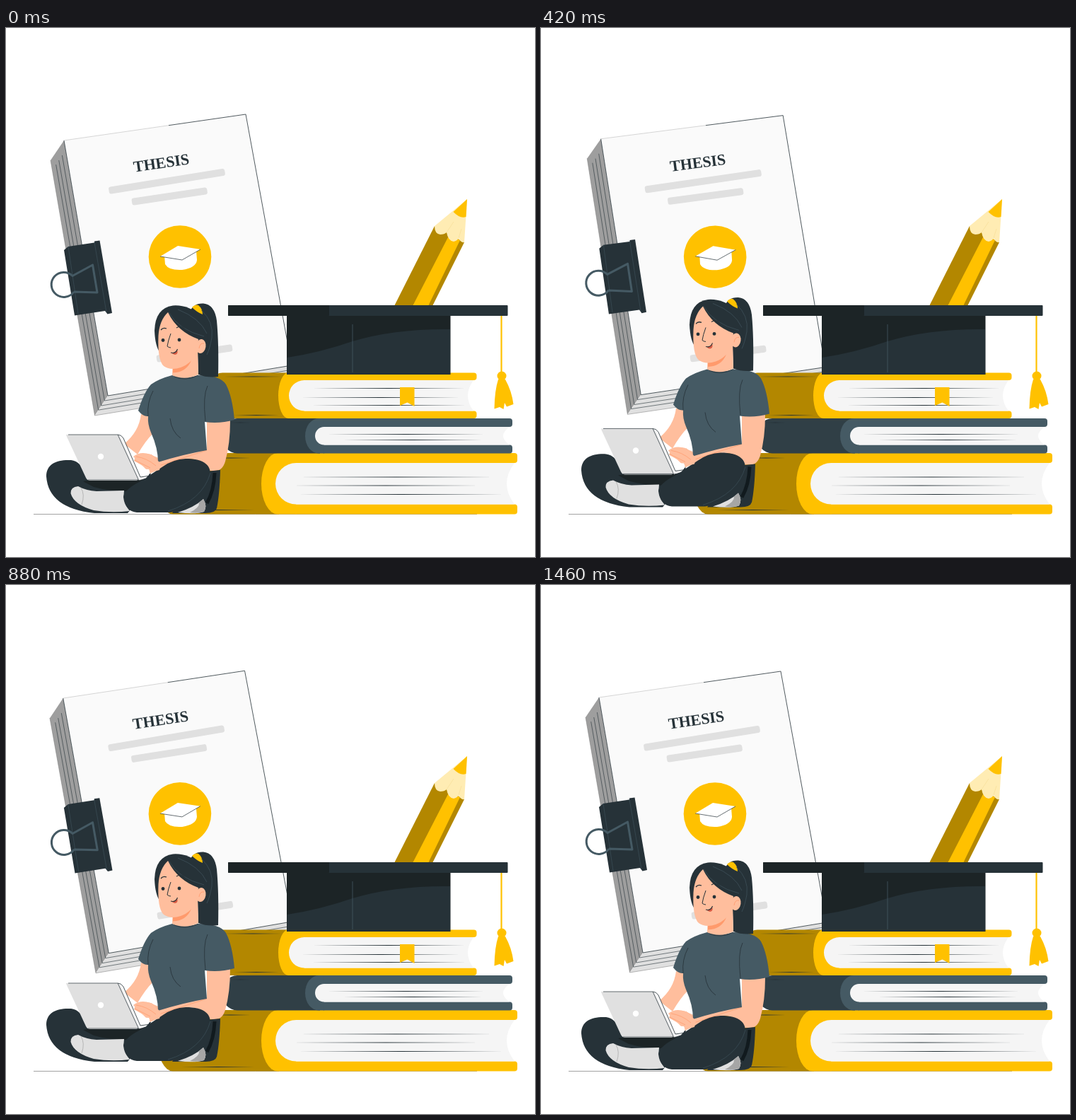
Animation of 748x748 px, one loop 1.5 s. Source, as an HTML page with a canvas:

```html
<!DOCTYPE html>
<html lang="en">
<head>
<meta charset="utf-8">
<title>Thesis</title>
<style>
  html, body { margin: 0; width: 100%; height: 100%; overflow: hidden; background: #fff; }
  canvas { display: block; width: 748px; height: 748px; }
</style>
</head>
<body>
<canvas id="stage" width="748" height="748"></canvas>
<script>
const ctx = document.getElementById('stage').getContext('2d');
const YELLOW = '#ffc100', GOLD = '#b38700', INK = '#263238', SHADE = '#1c2426',
  SLATE = '#455a64', GREY = '#e0e0e0', SKIN = '#ffbe9d', BLUSH = '#ff9a6c';
const LOOP = 1500, STEP = 1500 / 36, LAST = 35;

function fill(d, color) {
  ctx.fillStyle = color;
  ctx.fill(new Path2D(d));
}
function line(d, color = INK, width = 0.8) {
  ctx.strokeStyle = color;
  ctx.lineWidth = width;
  ctx.stroke(new Path2D(d));
}
// A horizontal line that thins out towards both ends.
function taper(y, x1, x2) {
  const mid = (x1 + x2) / 2;
  fill(`M${x1} ${y}Q${mid} ${y - 0.9} ${x2} ${y}Q${mid} ${y + 0.9} ${x1} ${y}`, INK);
}
function disc(x, y, r, color) {
  ctx.fillStyle = color;
  ctx.beginPath();
  ctx.arc(x, y, r, 0, Math.PI * 2);
  ctx.fill();
}
function box(x, y, w, h, radii, color) {
  ctx.fillStyle = color;
  ctx.beginPath();
  ctx.roundRect(x, y, w, h, radii);
  ctx.fill();
}
function bar(x1, y1, x2, y2) {
  ctx.save();
  ctx.translate(x1, y1);
  ctx.rotate(Math.atan2(y2 - y1, x2 - x1));
  box(0, -5, Math.hypot(x2 - x1, y2 - y1), 10, 3, GREY);
  ctx.restore();
}

function paper() {
  fill('M82 159L63 187L125.500 548L144 520Z', '#9e9e9e');
  fill('M144 520L125.500 548L385 506L404 477Z', GREY);
  for (const k of [0.25, 0.5, 0.72]) {
    const dx = -18.5 * k, dy = 28 * k;
    line(`M${84 + dx} ${173 + dy}L${144 + dx} ${520 + dy}L${404 + dx} ${477 + dy}`, INK, 0.6);
  }
  line('M63 187L125.500 548L385 506', '#777', 0.5);
  fill('M82 159L339 122L404 477L144 520Z', '#fafafa');
  line('M230 137.700L339 122L404 477L144 520L82 159', INK, 0.8);
  line('M82 159L230 137.700', '#bbb', 0.6);

  ctx.save();
  ctx.translate(220.5, 198);
  ctx.rotate(-8.2 * Math.PI / 180);
  ctx.font = 'bold 22px "Liberation Serif", "Times New Roman", serif';
  ctx.textAlign = 'center';
  ctx.fillStyle = INK;
  ctx.fillText('THESIS', 0, 0);
  ctx.restore();
  bar(145.5, 230, 309.5, 203.5);
  bar(178, 246, 284.5, 230);
  bar(213, 468, 320, 452);

  disc(246, 323.5, 44.3, YELLOW);
  fill('M224 322L225 334Q230 343 249 342Q269 339 270 328L269 315Z', '#fff');
  fill('M218 323L243 308L275 313L249 328Z', '#fff');
  line('M218 323L249 328L275 313', INK, 0.7);
  clip();
}

function clip() {
  fill('M82 314L88 309L125 303.500L125 301.500L132.500 300.500L150 403L143.500 404.500L140 400L97 406.500Z', INK);
  line('M88 309L102 404M125 303L142 402', SLATE, 0.5);
  ctx.lineJoin = 'round';
  line('M96 373L129 374L122.500 335L94 350.500A17.500 17.500 0 1 0 96 373', SLATE, 3);
}

function book(b) {
  const { top, bottom, band, cover, curve, page, right, end, bite, color } = b;
  const ry = (bottom - top) / 2, py = ry - band;
  const round = page + py;
  fill(`M${cover + curve + 2} ${top}H${b.spine + 22}A22 ${ry} 0 0 0 ${b.spine + 22} ${bottom}H${cover + curve + 2}Z`, b.back);
  fill(`M${round} ${top}H${cover + curve}A${curve} ${ry} 0 0 0 ${cover + curve} ${bottom}H${round}Z`, color);
  box(round - 1, top, right - round + 1, band, [0, 4, 4, 0], color);
  box(round - 1, bottom - band, right - round + 1, band, [0, 4, 4, 0], color);
  fill(`M${end} ${top + band}H${round}A${py} ${py} 0 0 0 ${round} ${bottom - band}H${end}Q${end - bite * 2} ${top + ry} ${end} ${top + band}`, '#f5f5f5');
  for (const [y, x1, x2] of b.lines) taper(y, x1, x2);
}

function books() {
  book({ top: 601, bottom: 687.5, band: 14, spine: 214, cover: 361, curve: 23, page: 381,
    right: 723, end: 719, bite: 11, color: YELLOW, back: GOLD,
    lines: [[635, 414, 690], [647, 404, 670], [659.5, 414, 703], [608, 290, 346], [681.5, 248, 351]] });
  book({ top: 552, bottom: 601.5, band: 12, spine: 305, cover: 423, curve: 19, page: 437,
    right: 716, end: 712, bite: 9, color: SLATE, back: '#303f46',
    lines: [[574.5, 455, 676], [582.5, 477, 673], [558, 318, 345]] });
  book({ top: 487.5, bottom: 552, band: 10.5, spine: 284, cover: 385, curve: 14, page: 400,
    right: 665.5, end: 661, bite: 8, color: YELLOW, back: GOLD,
    lines: [[509.5, 434, 649], [522.5, 418, 641], [533.5, 432, 651], [493, 308, 390], [547.5, 322, 386]] });
  fill('M557 508H577.500V535L567.500 529.500L557 534Z', YELLOW);
}

function pencil() {
  fill('M606 280L549 393H603L648 303Z', GOLD);
  fill('M627 292L575 393H597L642 300Z', YELLOW);
  fill('M606 280Q606 291 614 292Q620 292 623 289Q625 301 633 302Q638 301 640 297Q643 304 648 303L652 242Z', '#ffecb3');
  fill('M652 242L632.500 260Q642 270 650.500 267Z', YELLOW);
  line('M623 289L633 274M640 297L644 284', '#f3d98c', 0.5);
}

function hat() {
  box(397, 405, 231.5, 85, 0, SHADE);
  fill('M397.500 466Q444 459 490 443Q550 425 628 426V489.500H397.500Z', INK);
  line('M490 419V487', SLATE);
  box(314, 392, 395.5, 15, 1, INK);
  box(314, 392, 143, 15, 1, SHADE);
  line('M700.500 407V488', YELLOW, 2.2);
  disc(701, 492, 6.5, YELLOW);
  fill('M696 497H706Q715 513 717.500 532L708 535.500L705 530L703.500 539L698 536L690.500 538.500Q691 512 696 497Z', YELLOW);
}

function legs() {
  fill('M283 627L303 625Q302 660 298 679Q296 686 282 686H235L260 650Z', INK);
  line('M295 629Q294 655 284 672', '#111a1e', 5);
  fill('M57 634C57 616 72 610 92 611Q106 612 118 638L205 630L190 665L172 686H125Q60 679 57 634Z', INK);
  fill('M109 641Q150 634 196 637L170 655Q145 655 124 649Z', SHADE);
  fill('M91.500 658Q91 649 102 648Q113 654 128 655L167 654Q164 670 175 683Q148 686 124 682Q96 674 91.500 658Z', GREY);
  line('M106 650Q112 660 107 674', '#999', 0.6);
  fill('M166 663Q168 652 190 641L222 620Q236 610 254 609C281 609 292 619 288 636Q284 656 262 671Q248 684 232 685H185Q168 683 166 663Z', INK);
  fill('M243 685Q266 678 279 666Q285 676 280 684Q268 688 243 685Z', GREY);
  fill('M260 685Q274 678 273 671L279 666Q285 676 280 684Q270 687 260 685Z', '#a6a6a6');
  line('M229 683Q278 668 289 629', SLATE, 0.5);
}

function torso() {
  fill('M191 546L203 549L208 573Q197 584 186 603L167 588Q188 571 191 546Z', SKIN);
  fill('M284 555H317Q317 588 310 613Q306 626 296 626L287 626Q279 609 256 609Q238 613 219 623L204 630L180 606Q190 598 204 603L218 609L284 596Z', SKIN);
  line('M284 597L216 619M183 612L199 621M184 606L207 620M205 603L215 612', BLUSH, 0.7);
  fill('M235 491Q253 497 272 491Q303 491 311 504Q320 521 323 554Q302 560 281 557L284 597Q250 603 215 614Q215 594 205 572Q200 560 201 549Q194 550 187 541Q195 515 205 504Q216 496 235 491Z', SLATE);
  line('M285 506Q278 520 282 556M208 513Q199 530 201 549M232 552Q234 571 247 580M238 493Q254 500 272 491', INK, 0.8);
}

function laptop() {
  fill('M180 623L202 624Q206 630 198 636L188 639Z', '#fff');
  fill('M158 575Q163 575 166 580L189 633L199 636L188 640Z', '#f5f5f5');
  line('M158 575Q163 575 166 580L190 635L204 633Q198 639 188 639.500', INK, 0.8);
  fill('M85 575H156Q159 575 161 579L187 637Q187 640 184 640H119Q115 640 113 636L86 578Z', GREY);
  line('M88 575H158L187 638M116 639H188', INK, 0.7);
  disc(134, 606, 4.2, '#fff');
}

function head() {
  fill('M260 402Q264 389 279 389.500Q295 391 298 414Q301 445 300 493Q285 495 272 490L270 430Z', INK);
  fill('M210 428Q211 396 236 392.500Q258 391 275 407Q286 421 284 441L274 450L218 459Q211 451 210 428Z', INK);
  fill('M236 465L271 452L272 490Q253 499 235 491Z', SKIN);
  fill('M236 480L262 470Q255 487 236 487.500Z', BLUSH);
  fill('M229 402Q217 413 215.500 435Q214 470 223 478Q233 485 247 480Q262 475 271 457L272 440Q242 429 229 402Z', SKIN);
  ctx.fillStyle = SKIN;
  ctx.beginPath();
  ctx.ellipse(275.5, 450, 7, 10, 0.15, 0, Math.PI * 2);
  ctx.fill();
  line('M273 453Q274 445 280 446', BLUSH);
  fill('M263 395Q268 390 272 392Q278 397 278 405Q270 402 263 395Z', YELLOW);
  line('M230 402Q244 427 280 436M243 398Q274 410 284 432M276 399Q294 415 291 438Q288 454 284 462', SLATE, 0.6);
  disc(222, 441.5, 2.4, INK);
  disc(245, 441, 2.4, INK);
  line('M219 427Q222 423 227 425M241 424Q247 420 253 426', INK, 1.3);
  line('M233 432Q229 443 228 450Q230 452 233 452', INK, 1);
  fill('M234 459Q239 460 242 455Q244 461 239 462Q236 462 234 459Z', '#d95b43');
  line('M233 459Q240 461 242.500 454', INK, 1.1);
}

function woman() {
  torso();
  legs();
  fill('M183 606Q199 599 207 604L219 616L217 625Q207 628 202 624L181 612Z', SKIN);
  line('M182 611L204 622M184 606Q199 608 212 619', BLUSH, 0.7);
  laptop();
  head();
}

// Triangle wave: 0 at the ends, 1 in the middle.
const tent = u => 1 - Math.abs(2 * u - 1);

function draw(ms) {
  const u = Math.min(LAST, Math.floor((ms % LOOP + 5) / STEP)) / LAST;
  const tilt = 2 * tent((u + 0.25) % 1) - 1;
  const lift = 15 * tent(u);

  ctx.fillStyle = '#fff';
  ctx.fillRect(0, 0, 748, 748);
  ctx.save();
  ctx.translate(233, 335);
  ctx.rotate(tilt * Math.PI / 180);
  ctx.translate(-233, -335);
  paper();
  ctx.restore();
  line('M39 687.500H666', '#666', 0.6);
  books();
  pencil();
  hat();
  ctx.save();
  ctx.translate(0, -lift);
  woman();
  ctx.restore();
}

const start = performance.now();
function tick(now) {
  draw(Math.max(0, now - start));
  requestAnimationFrame(tick);
}
draw(0);
requestAnimationFrame(tick);
</script>
</body>
</html>
```
